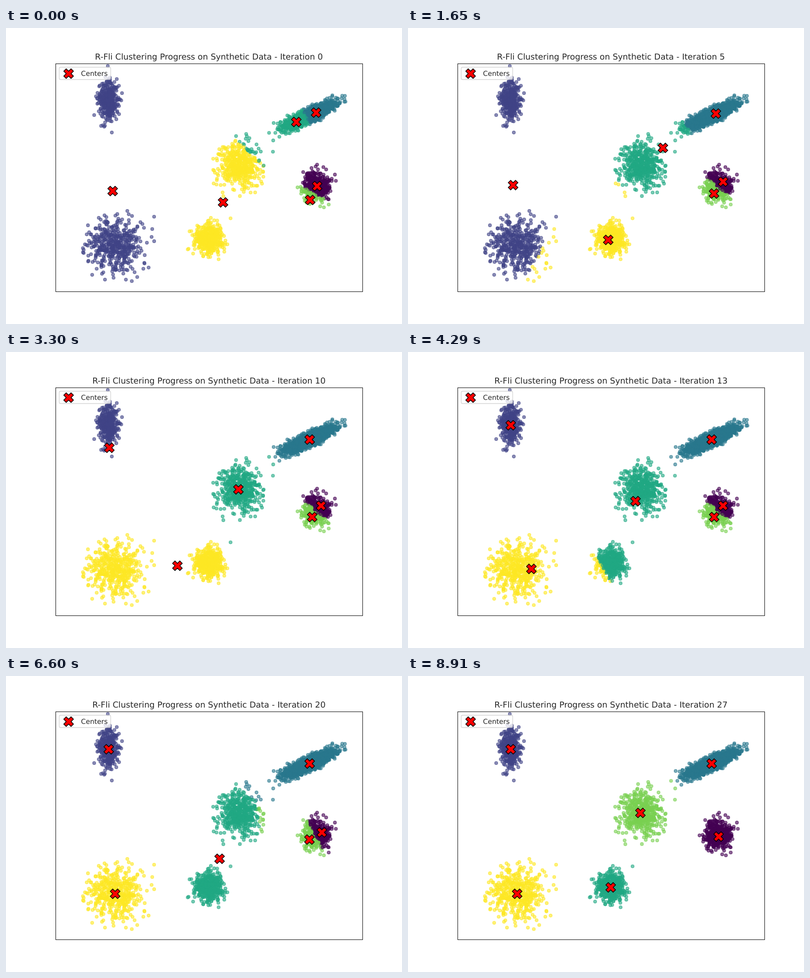
Write an HTML page with a canvas that moves like this. It is 800x600 px and loops after 9240 ms.

```html
<!DOCTYPE html>
<html lang="en">
<head>
<meta charset="utf-8">
<title>Clustering progress</title>
<style>
  html, body { margin: 0; width: 100%; height: 100%; overflow: hidden; background: #fff; }
  canvas, svg { position: absolute; left: 0; top: 0; width: 800px; height: 600px; }
  text { font-family: "DejaVu Sans", sans-serif; fill: #262626; text-rendering: geometricPrecision; }
</style>
</head>
<body>
<canvas id="plot" width="800" height="600"></canvas>
<svg viewBox="0 0 800 600">
  <text id="title" x="410" y="64" font-size="16.67" text-anchor="middle"></text>
  <rect x="107.5" y="79.5" width="104" height="25" rx="2.8" fill="#fff" stroke="#ccc" stroke-width="1.3" opacity=".8"/>
  <path d="M121.6 82.7l4.9 4.9 4.9-4.9 4.9 4.9-4.9 4.9 4.9 4.9-4.9 4.9-4.9-4.9-4.9 4.9-4.9-4.9 4.9-4.9-4.9-4.9z" fill="red" stroke="#000" stroke-width="1.4"/>
  <text x="151.5" y="96.5" font-size="13.89">Centers</text>
</svg>
<script>
const STEP = 330, STEPS = 28;
const Y_WEIGHT = 0.9; // vertical share of the squared distance
const ctx = document.getElementById('plot').getContext('2d');
const title = document.getElementById('title');

const move = (from, until, x, y) => ({ from, until, x, y });

// Each center starts at (x, y) and eases through its moves, timed in iterations.
const centers = [
  { color: '#440154', x: 628, y: 320, moves: [move(0, 5, 636, 311), move(13, 23, 638, 318), move(23, 27, 627, 325)] },
  { color: '#414487', x: 215, y: 330, moves: [move(0, 3, 212, 324), move(4, 13, 207, 148)] },
  { color: '#2a788e', x: 626, y: 171, moves: [move(0, 3, 630, 169), move(3, 7, 613, 177)] },
  { color: '#22a884', x: 586, y: 190, moves: [move(0, 3, 560, 207), move(3, 7, 469, 278), move(11, 17, 431, 370), move(23, 27, 409, 428)] },
  { color: '#7ad151', x: 614, y: 348, moves: [move(0, 6, 618, 334), move(17, 23, 607, 328), move(23, 27, 469, 277)] },
  { color: '#fde725', x: 438, y: 353, moves: [move(0, 5, 404, 429), move(7, 15, 220, 441)] }
];

const clouds = [
  { x: 207, y: 148, sx: 9.3, sy: 21, n: 400 },
  { x: 221, y: 439, sx: 27, sy: 27, n: 500 },
  { x: 469, y: 277, sx: 20, sy: 22, n: 530 },
  { x: 410, y: 427, sx: 14, sy: 14, n: 540 },
  { x: 627, y: 322, sx: 13.5, sy: 14, n: 540 },
  { x: 613, y: 177, sx: 27, sy: 6.6, tilt: -0.44, n: 1500 }
];

let seed = 20;
function random() {
  seed = (seed + 0x6D2B79F5) | 0;
  let r = Math.imul(seed ^ (seed >>> 15), 1 | seed);
  r = (r + Math.imul(r ^ (r >>> 7), 61 | r)) ^ r;
  return ((r ^ (r >>> 14)) >>> 0) / 4294967296;
}

// Normally distributed points, optionally turned about the cloud's middle
function cloudPoints({ x, y, sx, sy, tilt = 0, n }) {
  const cos = Math.cos(tilt), sin = Math.sin(tilt);
  return Array.from({ length: n }, () => {
    const radius = Math.sqrt(-2 * Math.log(1 - random()));
    const angle = random() * 2 * Math.PI;
    const u = sx * radius * Math.cos(angle), v = sy * radius * Math.sin(angle);
    return [x + u * cos - v * sin, y + u * sin + v * cos];
  });
}

const points = clouds.flatMap(cloudPoints);

function ease(p) {
  const t = Math.min(1, Math.max(0, p));
  return t * t * (3 - 2 * t);
}

function centerAt({ color, x, y, moves }, iteration) {
  for (const m of moves) {
    const p = ease((iteration - m.from) / (m.until - m.from));
    x += (m.x - x) * p;
    y += (m.y - y) * p;
  }
  return { color, x, y };
}

function nearest(x, y, list) {
  const distance = c => (x - c.x) ** 2 + Y_WEIGHT * (y - c.y) ** 2;
  return list.reduce((a, b) => distance(b) < distance(a) ? b : a);
}

function drawDot(x, y, color) {
  ctx.fillStyle = ctx.strokeStyle = color;
  ctx.beginPath();
  ctx.arc(x, y, 3.1, 0, 2 * Math.PI);
  ctx.fill();
  ctx.stroke();
}

// Four quarter turns of one arm
function drawCross({ x, y }) {
  const a = 4.9;
  let arm = [[-a, -2 * a], [0, -a], [a, -2 * a]];
  ctx.beginPath();
  for (let i = 0; i < 4; i++) {
    for (const [dx, dy] of arm) ctx.lineTo(x + dx, y + dy);
    arm = arm.map(([dx, dy]) => [-dy, dx]);
  }
  ctx.closePath();
  ctx.fill();
  ctx.stroke();
}

function draw(iteration) {
  const current = centers.map(c => centerAt(c, iteration));
  ctx.setTransform(1, 0, 0, 1, 0, 0);
  ctx.fillStyle = '#fff';
  ctx.fillRect(0, 0, 800, 600);
  ctx.translate(0.5, 0.5);

  ctx.globalAlpha = 0.6;
  ctx.lineWidth = 1.39;
  for (const [x, y] of points) drawDot(x, y, nearest(x, y, current).color);

  ctx.globalAlpha = 1;
  ctx.fillStyle = 'red';
  ctx.strokeStyle = '#000';
  current.forEach(drawCross);

  ctx.lineWidth = 1.11;
  ctx.strokeStyle = '#262626';
  ctx.strokeRect(100, 72, 620, 462);
  title.textContent = `R-Fli Clustering Progress on Synthetic Data - Iteration ${iteration}`;
}

let shown = -1;
function tick() {
  const iteration = Math.floor(performance.now() / STEP) % STEPS;
  if (iteration !== shown) draw(shown = iteration);
  requestAnimationFrame(tick);
}
tick();
</script>
</body>
</html>
```
